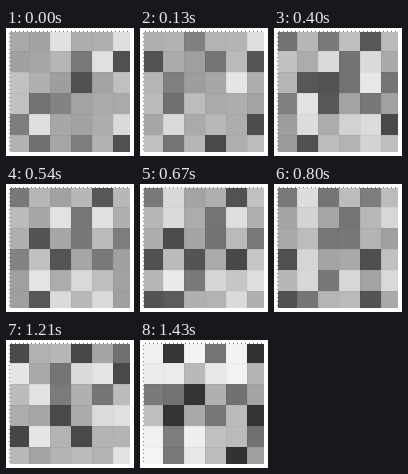
Animation of 128 by 128 pixels, one loop 1.52 s. Source, as an HTML page with a canvas:

```html
<!DOCTYPE html>
<html lang="en">
<head>
<meta charset="utf-8">
<title>Flickering grey tiles</title>
<style>
  html, body { margin: 0; width: 100%; height: 100%; overflow: hidden; background: #fff; }
  canvas { display: block; width: 128px; height: 128px; }
</style>
</head>
<body>
<canvas id="board" width="128" height="128"></canvas>
<script>
const ctx = document.getElementById('board').getContext('2d');
const SIDE = 6, PITCH = 21, ORIGIN = 2, LOW = 4, HIGH = 124;

// Accent tiles are row * 10 + column; all others take a seeded middle grey.
// hold: how long the pose and the mixed steps after it stay, in ms.
const poses = [
  { hold: [40, 90, 140], black: 82, white: 224,
    dark: [15, 23, 55], dim: [13, 31, 32, 40, 51, 53], pale: [2, 5, 14, 41, 45] },
  { hold: [40, 90, 140], black: 80, white: 222,
    dark: [10, 13, 22, 45, 53], dim: [2, 21, 33, 34, 51], pale: [11, 24, 31, 44] },
  { hold: [40, 90, 40, 90], black: 86, white: 224,
    dark: [4, 21, 32, 51], dim: [0, 13, 23, 25, 30, 34], pale: [12, 14, 41, 43, 52, 54] },
  { hold: [140, 40, 90], black: 82, white: 216,
    dark: [30, 34, 50, 54], dim: [0, 2, 4, 13, 22, 23, 42, 51],
    pale: [1, 11, 15, 31, 41, 43, 45] },
  { hold: [140], black: 80, white: 220,
    dark: [0, 20, 24], dim: [3, 12, 15, 32, 33, 40, 43], pale: [11, 13, 21, 41, 51, 53] },
  { hold: [40, 90, 90], black: 74, white: 224,
    dark: [0, 3, 15, 32, 40, 43], dim: [5, 12, 22, 24], pale: [10, 13, 14, 21, 34, 35, 41, 55] },
  { hold: [90], black: 52, white: 238,
    dark: [1, 5, 22, 31, 35, 54], dim: [3, 20, 21, 24, 33, 41, 45, 51],
    pale: [0, 2, 4, 10, 11, 13, 14, 40, 42, 50, 52] }
];

function random(seed) {
  let s = seed * 7919 + 17;
  return () => {
    s = (Math.imul(s, 1664525) + 1013904223) >>> 0;
    return s / 4294967296;
  };
}

function tones(pose, index) {
  const rnd = random(index + 1);
  return Array.from({ length: SIDE * SIDE }, (_, i) => {
    const tile = Math.floor(i / SIDE) * 10 + i % SIDE;
    const spread = rnd() - 0.5;
    if (pose.dark.includes(tile)) return pose.black + spread * 6;
    if (pose.dim.includes(tile)) return 122 + spread * 20;
    if (pose.pale.includes(tile)) return pose.white + spread * 14;
    return 177 + spread * 36;
  });
}

// Steps between two poses take each tile from one or the other.
function mix(from, to, share, seed) {
  const rnd = random(seed);
  return from.map((tone, i) => (rnd() < share ? to[i] : tone) + rnd() * 16 - 8);
}

const keys = poses.map(tones);
const steps = [];
let loop = 0;
poses.forEach((pose, p) => {
  const next = keys[(p + 1) % keys.length];
  pose.hold.forEach((ms, n) => {
    const board = n ? mix(keys[p], next, n / pose.hold.length, 40 + p * 5 + n) : keys[p];
    steps.push({ at: loop, board });
    loop += ms;
  });
});

const grey = t => `rgb(${Math.round(t)},${Math.round(t - 2)},${Math.round(t + 1)})`;

function draw(board) {
  ctx.fillStyle = '#fff';
  ctx.fillRect(0, 0, 128, 128);
  ctx.save();
  ctx.beginPath();
  ctx.rect(LOW, LOW, HIGH - LOW, HIGH - LOW);
  ctx.clip();
  board.forEach((tone, i) => {
    const x = ORIGIN + i % SIDE * PITCH;
    const y = ORIGIN + Math.floor(i / SIDE) * PITCH;
    ctx.fillStyle = grey(tone);
    ctx.fillRect(x, y, PITCH, PITCH);
    ctx.fillStyle = 'rgba(0,0,0,.04)';
    ctx.fillRect(x, y, PITCH, 1);
    ctx.fillRect(x, y, 1, PITCH);
  });
  ctx.restore();
  drawDots();
}

// Fine dots along the top and left edges.
function drawDots() {
  ctx.fillStyle = '#77757a';
  for (let p = LOW + 1; p < HIGH; p += 4) {
    ctx.fillRect(p, LOW - 1, 1, 1);
    ctx.fillRect(LOW - 1, p, 1, 1);
  }
}

let shown = null;
const start = performance.now();
function tick() {
  const t = (performance.now() - start) % loop;
  const step = steps.filter(s => s.at <= t).pop();
  if (step !== shown) draw((shown = step).board);
  requestAnimationFrame(tick);
}
tick();
</script>
</body>
</html>
```
